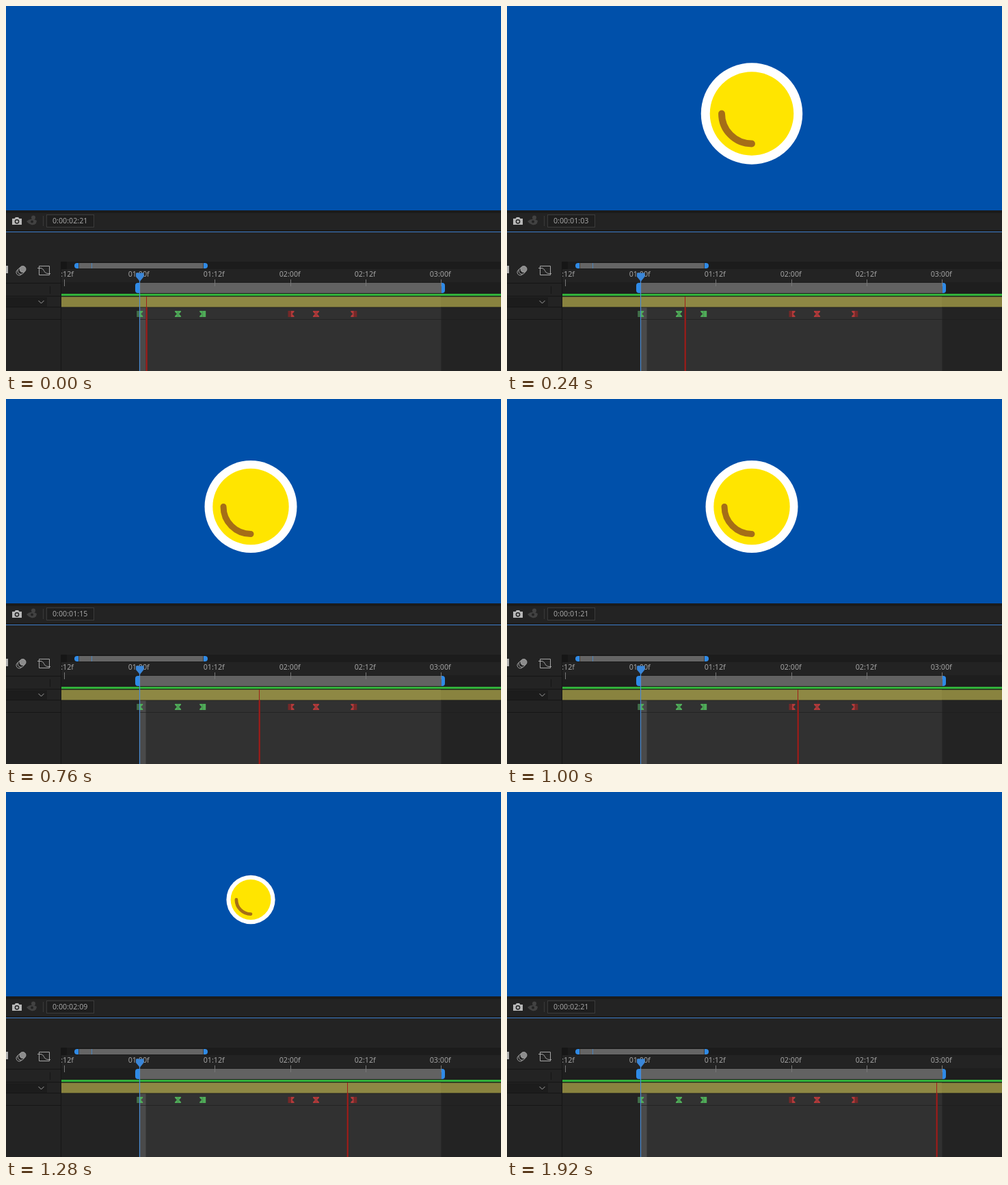
Animation, 724 px wide and 534 px high, one loop 1.96 s. Source, as an HTML page:

```html
<!DOCTYPE html>
<html lang="en">
<head>
<meta charset="utf-8">
<title>Pop animation in a timeline</title>
<style>
html, body { margin: 0; width: 100%; height: 100%; overflow: hidden; background: #232323; }
svg { display: block; }
text { font: 10.7px "Noto Sans", "Open Sans", sans-serif; fill: #a3a3a3; }
</style>
</head>
<body>
<svg width="724" height="534" viewBox="0 0 724 534">
  <!-- viewer -->
  <rect width="724" height="299" fill="#0050aa"/>
  <g id="ball">
    <circle r="67.5" fill="#fff"/>
    <circle r="55.7" fill="#ffe500"/>
    <path d="M-40 0A40 40 0 0 0 0 40" fill="none" stroke="#a56e17" stroke-width="9" stroke-linecap="round"/>
  </g>

  <!-- viewer footer -->
  <path d="M0 299H724V303H0ZM0 328H724V330H0Z" fill="#1b1b1b"/>
  <path d="M0 330.5H724" stroke="#3f7fcd"/>
  <path d="M9 311h3.5l1.5-2h4l1.5 2H23v9H9Z" fill="#b8b8b8"/>
  <circle cx="16" cy="315.3" r="2.6" fill="#b8b8b8" stroke="#232323" stroke-width="1.5"/>
  <g fill="#424242">
    <circle cx="40" cy="309.5" r="3"/>
    <path d="M30 315q7-6 15-1l-1 4q-3 3-7 2q-4-1-7-5Z"/>
    <circle cx="38" cy="315.5" r="2" fill="#232323"/>
  </g>
  <path d="M54.5 307V322" stroke="#3a3a3a"/>
  <rect x="59.5" y="305.5" width="69" height="18" fill="#1e1e1e" stroke="#3b3b3b"/>
  <text id="code" x="68" y="318"></text>

  <!-- left column -->
  <path d="M0 380h3v11H0Z" fill="#b0b0b0"/>
  <g stroke="#a5a5a5" fill="#232323">
    <circle cx="19.5" cy="389.5" r="4.5"/>
    <circle cx="22" cy="387.5" r="4.8"/>
    <circle cx="24.5" cy="385" r="4.5" fill="#8c8c8c"/>
    <path d="M48.5 380.5h15v13h-15ZM46 383.5h5M61 391.5h4M50 383.5c7 0 4 8 12 8" fill="none"/>
  </g>
  <path d="M0 405.5H80M0 424.5H80M0 440.5H80M0 458.5H80M64.5 410V421" stroke="#151515"/>
  <rect y="426" width="60" height="14" fill="#1c1c1c"/>
  <path d="M47.5 431l4 4l4-4" fill="none" stroke="#a0a0a0"/>

  <!-- navigator and ruler -->
  <path d="M81 374H724V385H81Z" fill="#1c1c1c"/>
  <path d="M81 374h8v11h-8Z" fill="#161616"/>
  <path d="M106.5 376H288.5V384H106.5Z" fill="#656565"/>
  <path d="M125.5 376V384" stroke="#4b83b8"/>
  <path d="M106 376v8h-2a4 4 0 0 1 0-8ZM289 376v8h2a4 4 0 0 0 0-8Z" fill="#2f8ae6"/>
  <g id="ruler"></g>

  <!-- work area and layers -->
  <path d="M81 404H724V421H81Z" fill="#1e1e1e"/>
  <path d="M195 405H637V420H195Z" fill="#626262"/>
  <path d="M195 405v15h-2q-4 0-4-4v-7q0-4 4-4ZM637 405v15h1q4 0 4-4v-7q0-4-4-4Z" fill="#2f8ae6"/>
  <path d="M81 421H724V424H81Z" fill="#32b23a"/>
  <path d="M81 424H724V426H81Z" fill="#1c2a1c"/>
  <path d="M81 425.5H724V440.5H81Z" fill="#89833f"/>
  <path d="M196 425.5H636V440.5H196Z" fill="#8e8844"/>
  <path d="M196 441H636.5V534H196Z" fill="#313131"/>
  <path d="M196 441H204.5V534H196Z" fill="#4a4a4a"/>
  <path d="M81 441H724M81 458.5H724" stroke="#1f1f1f" stroke-opacity=".7"/>
  <path d="M80.5 374V534" stroke="#151515"/>
  <g id="keys"></g>

  <!-- playheads -->
  <path d="M195.5 400V534" stroke="#4a8cd6" stroke-width="1.2"/>
  <path d="M190 390.5h11.5v5.5l-5.7 7l-5.8-7Z" fill="#3a86d8"/>
  <g id="head">
    <path d="M0 441H2.5V534H0Z" fill="#861c1c"/>
    <path d="M.5 425H1.5V534H.5Z" fill="#a01f1a"/>
  </g>
</svg>
<script>
const $ = id => document.getElementById(id);
const STEP = 110.2 / 12;              // pixels per composition frame
const frameX = f => 196.4 + f * STEP;

// ruler labels, one per half second
[":12f", "01:00f", "01:12f", "02:00f", "02:12f", "03:00f"].forEach((label, i) => {
  const x = Math.floor(85.5 + i * 110.2);
  $("ruler").innerHTML +=
    `<path d="M${x + .5} 400V410" stroke="#777"/>` +
    `<text x="${i ? x - .8 : 99}" y="396" text-anchor="${i ? "middle" : "end"}">${label}</text>`;
});
$("ruler").parentNode.insertBefore($("ruler"), $("keys"));

// keyframe icons: each side is a square or half an hourglass
const half = (side, shape) => shape === "ease"
  ? `M0 -4.5H${side * 4.5}V-3L${side * 1.5} 0L${side * 4.5} 3V4.5H0Z`
  : `M0 -4.5H${side * 4.5}V4.5H0Z`;
function key(x, left, right, light, dim) {
  const side = (s, shape) => `<path d="${half(s, shape)}" fill="${shape === "dim" ? dim : light}"/>`;
  $("keys").innerHTML += `<g transform="translate(${x} 450.5)">${side(-1, left)}${side(1, right)}</g>`;
}
const green = ["#4fab58", "#41704a"], red = ["#b33a3a", "#762828"];
key(195.7, "dim", "ease", ...green);
key(251.5, "ease", "ease", ...green);
key(287.7, "ease", "full", ...green);
key(417, "dim", "ease", ...red);
key(453.5, "ease", "ease", ...red);
key(508.8, "ease", "dim", ...red);

// eased progress with horizontal tangents of length a and b
function ease(u, a, b) {
  if (u <= 0 || u >= 1) return u <= 0 ? 0 : 1;
  let lo = 0, hi = 1;
  for (let i = 0; i < 30; i++) {
    const s = (lo + hi) / 2, r = 1 - s;
    const x = 3 * r * r * s * a + 3 * r * s * s * (1 - b) + s * s * s;
    if (x < u) lo = s; else hi = s;
  }
  return lo * lo * (3 - 2 * lo);
}
// the exit mirrors the entrance
function scaleAt(f) {
  const g = f > 17 ? 34 - f : f;
  return 1.1 * ease(g / 6, .33, .75) - .1 * ease((g - 6) / 4, .33, .33);
}

// playback falls behind, catches up, and stutters on a few refreshes
const stalls = [2, 8, 21, 27, 43];
function playedFrame(slot) {
  const lag = (slot >= 14 && slot < 31) || slot >= 34 ? (slot >= 39 ? 2 : 1) : 0;
  return slot + 1 - lag - stalls.includes(slot);
}

const pad = n => String(n).padStart(2, "0");
function draw(now) {
  const n = playedFrame(Math.floor((now % 1960) / 40));
  const shown = n < 3 ? 45 : n - (n - 3) % 6;    // readout refreshes every 6 frames
  $("code").textContent = `0:00:${pad(1 + Math.floor(shown / 24))}:${pad(shown % 24)}`;
  $("ball").setAttribute("transform", `translate(358 157.5) scale(${Math.max(0, scaleAt(n - 1))})`);
  $("head").setAttribute("transform", `translate(${Math.floor(frameX(n)) - .5} 0)`);
}
const start = performance.now();
function tick() {
  draw(performance.now() - start);
  requestAnimationFrame(tick);
}
tick();
</script>
</body>
</html>
```
